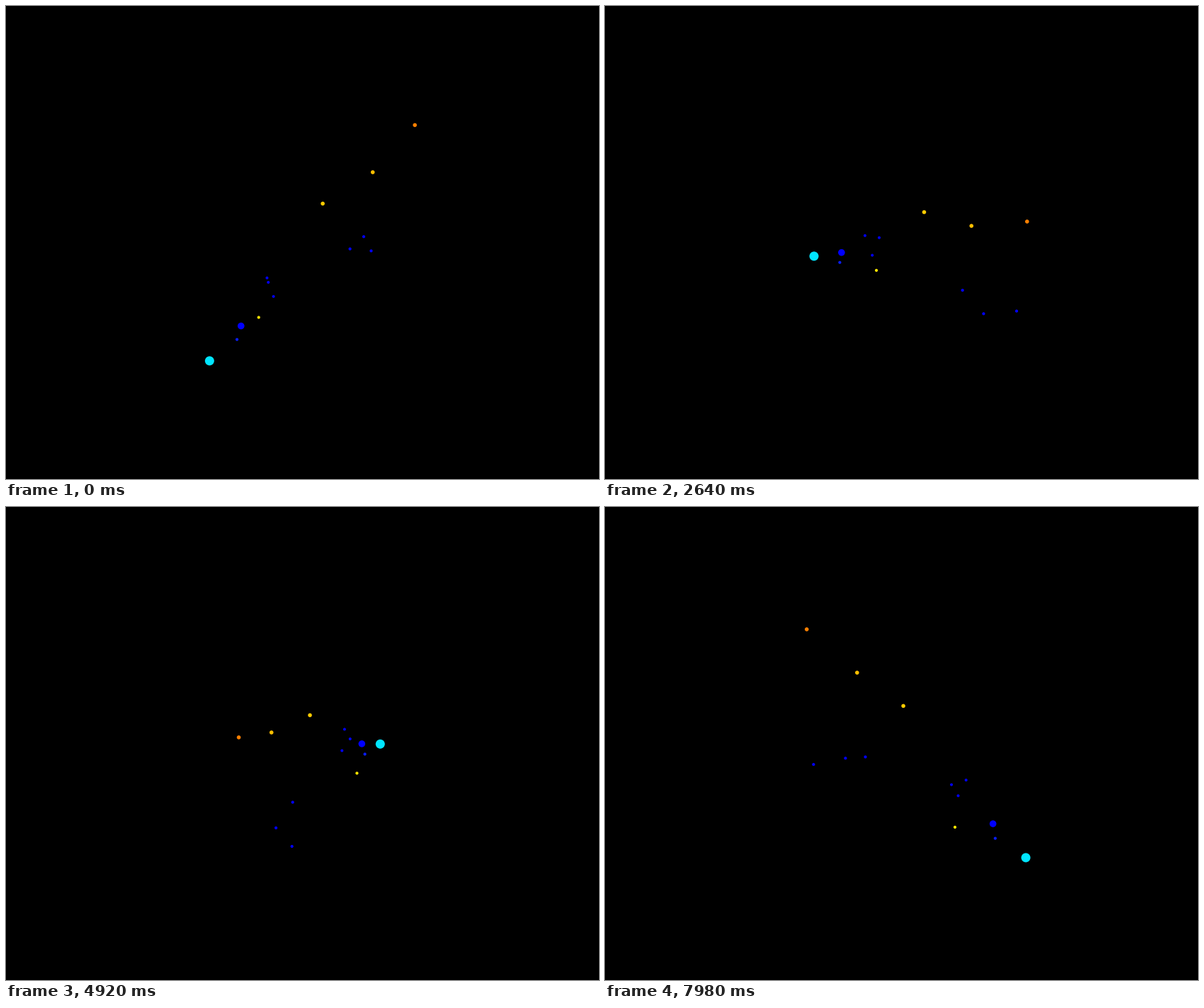
Animation of 837 by 669 pixels, one loop 8000 ms. Source, as a matplotlib script:

```python
import numpy as np
import matplotlib.pyplot as plt
from matplotlib.animation import FuncAnimation

W, H, DPI = 837, 669, 64
CX, CY = 435.9, 330.9          # rotation axis on the stage
DIST = 2784.5                  # camera distance in pixels
ELEV = np.radians(30)
TICK, LOOP = 20, 8000

CYAN, BLUE, AZURE = "#00e5ff", "#0000ff", "#0a1eff"
ORANGE, GOLD, AMBER, LEMON = "#ff8000", "#ffcc00", "#ffbf00", "#ffe600"

# right, back, up, diameter, colour
DOTS = [
    (144.8, 144.8, 108.8, 5.6, ORANGE),
    (82.65, 75.45, 68.3, 5.6, AMBER),
    (11.1, 14.0, 51.0, 5.6, GOLD),
    (51.15, 66.6, -53.5, 4.2, BLUE),
    (82.9, 94.5, -73.15, 4.2, BLUE),
    (73.0, 141.5, -76.0, 4.2, BLUE),
    (-64.6, -68.4, -28.6, 4.0, BLUE),
    (-66.9, -47.85, -33.8, 4.0, BLUE),
    (-57.9, -58.3, -57.9, 4.0, BLUE),
    (-79.3, -52.3, -96.4, 4.2, LEMON),
    (-102.3, -103.1, -78.4, 9.6, BLUE),
    (-108.2, -106.05, -98.85, 4.2, AZURE),
    (-144.8, -144.8, -108.8, 13.0, CYAN),
]
right, back, up = np.array([d[:3] for d in DOTS]).T
sizes = np.array([(d[3] * 72 / DPI) ** 2 for d in DOTS])
colors = np.array([d[4] for d in DOTS])


def project(angle):
    """Stage positions and nearness of all dots after a turn by angle."""
    c, s = np.cos(angle), np.sin(angle)
    u = right * c + back * s
    front = right * s - back * c
    rise = up * np.cos(ELEV) - front * np.sin(ELEV)
    near = front * np.cos(ELEV) + up * np.sin(ELEV)
    scale = 1 / (1 - near / DIST)
    return np.column_stack([CX + u * scale, CY - rise * scale]), near


fig = plt.figure(figsize=(W / DPI, H / DPI), dpi=DPI, facecolor="black")
ax = fig.add_axes([0, 0, 1, 1])
ax.set_xlim(0, W)
ax.set_ylim(H, 0)
ax.axis("off")
dots = ax.scatter(right, up, s=sizes, c=colors, linewidths=0)


def draw(i):
    step = (2 * i + 1) // 3    # one degree every 30 ms
    pos, near = project(np.radians(step))
    order = np.argsort(near)
    dots.set_offsets(pos[order])
    dots.set_sizes(sizes[order], DPI)
    dots.set_facecolors(colors[order])
    return [dots]


anim = FuncAnimation(fig, draw, frames=LOOP // TICK, interval=TICK,
                     init_func=lambda: draw(0), repeat=True, repeat_delay=0)
plt.show()
```
